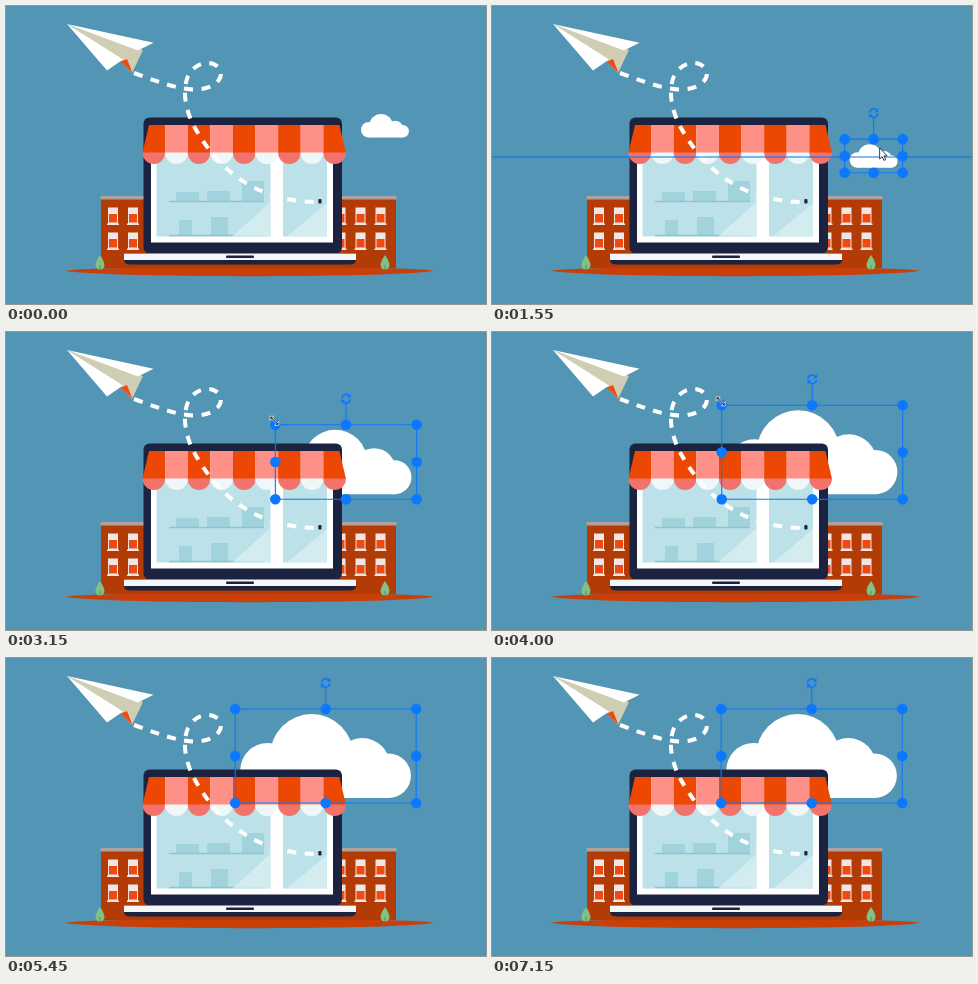
Write an HTML page that moves like this. It is 480 px wide and 298 px high and loops after 7200 ms.

```html
<!DOCTYPE html>
<html lang="en">
<head>
<meta charset="utf-8">
<title>Cloud over the shop</title>
<style>
  html, body { margin: 0; width: 100%; height: 100%; overflow: hidden; background: #5295b4; }
  svg { display: block; width: 100vw; height: 100vh; }
</style>
</head>
<body>
<svg viewBox="0 0 480 298" xmlns="http://www.w3.org/2000/svg">
  <defs>
    <g id="window">
      <path d="M.5 0h10v16h-10zM-.5 16h12v1.500h-12z" fill="#f1e6e4"/>
      <path d="M1.500 6.500h8v8.500h-8z" fill="#ef4a12"/>
    </g>
    <g id="bush">
      <path d="M0 -7C3 -3 4.500 1 4.500 3A4.500 4.500 0 0 1 -4.500 3C-4.500 1 -3 -3 0 -7z" fill="#7fc283"/>
      <path d="M0 3v5" stroke="#5b8c5c"/>
    </g>
  </defs>
  <rect width="480" height="298" fill="#5295b4"/>

  <g id="cloud" fill="#fff">
    <circle cx="27.5" cy="56.5" r="27.5"/>
    <circle cx="71.5" cy="41.5" r="41.5"/>
    <circle cx="122" cy="52" r="28"/>
    <circle cx="148.5" cy="61.8" r="22.2"/>
    <path d="M27.5 50h121v34h-121z"/>
  </g>

  <path d="M59.500 264.800C90 259.500 398 259.500 428 264.800C398 272 90 272 59.500 264.800z" fill="#c83f0a"/>
  <path d="M95 192h295v70h-295z" fill="#b23b06"/>
  <path d="M94.500 190h296v3.500h-296z" fill="#b0a19d"/>
  <g id="windows"></g>
  <use href="#bush" x="94" y="256"/>
  <use href="#bush" x="379" y="256"/>

  <rect x="137.5" y="111.5" width="198.500" height="136" rx="6" fill="#1c2340"/>
  <rect x="145" y="119" width="182" height="117.500" fill="#fff"/>
  <path d="M150.500 150h114v80.500h-114zM277 150h44v80.500h-44z" fill="#bce1e8"/>
  <path d="M170 186h23v9h-23zM201 185h23v10h-23zM236 175h22v20h-22zM173 214h13v16h-13zM205 211h17v19h-17z" fill="#a1d3dc"/>
  <path d="M163 195.500h95M163 229.500h95" stroke="#8fc4cf" stroke-width="1.500"/>
  <path d="M226 230.500L264.500 196V230.500zM281 230.500L321 197V230.500z" fill="#d9eff3" opacity=".8"/>
  <rect x="312.300" y="193" width="3.200" height="4.500" rx="1" fill="#1c2340"/>
  <g id="awning"></g>

  <path d="M118 247H350V254Q350 258.500 343 258.500H125Q118 258.500 118 254z" fill="#1c2340"/>
  <path d="M118 247.500H350V254H118z" fill="#f5f6f8"/>
  <rect x="220" y="249.500" width="28" height="2.500" rx="1" fill="#1c2340"/>

  <path d="M128 67C148 74 166 82 187 83.500C207 84 217 74 214.500 65C210 53 190 54 182 70C176 84 179 104 189 122C206 152 240 196 312 196"
    fill="none" stroke="#fff" stroke-width="4" stroke-dasharray="9 8.500"/>
  <path d="M61 18L137 44L126 67L115 55z" fill="#cfceb3"/>
  <path d="M61 18L101 64.500L117 53.500zM61 18L147.500 36.700L132 44.500z" fill="#fff"/>
  <path d="M115 55.500L121 53L126.500 67z" fill="#ee4a12"/>

  <path id="guide" d="M0 151H480" stroke="#0b72e8" stroke-width="1.200"/>
  <g id="selection" fill="none" stroke="#0b78ff">
    <path id="outline" stroke-width="1.100"/>
    <g id="handles" fill="#0b78ff" stroke="none"></g>
    <g id="rotate">
      <path d="M-4.200 -.5A4.300 4.300 0 0 1 3.200 -2.900M4.200 .5A4.300 4.300 0 0 1 -3.200 2.900" stroke-width="1.700"/>
      <path d="M4.800 -5.200V-1H.8zM-4.800 5.200V1H-.8z" fill="#0b78ff" stroke="none"/>
    </g>
  </g>
  <g id="cursor">
    <path id="arrow" d="M0 0V11L2.500 8.800L4.300 12.500L6 11.700L4.300 8H7.500z" fill="#fff" stroke="#222b38" stroke-width=".9"/>
    <path id="resizer" d="M-4.500 -4.500H-.5L-2 -3L3 2L4.500 .5V4.500H.5L2 3L-3 -2L-4.500 -.5z"
      fill="#1b2330" stroke="#fff" stroke-width=".7" stroke-linejoin="round"/>
  </g>
</svg>
<script>
const LOOP = 7200;
const CLOUD = { w: 171, h: 84 };
const PAD = 5, STEM = 26, SMALL = 58, LARGE = 181;
const $ = id => document.getElementById(id);

function add(parent, tag, attrs) {
  const node = document.createElementNS("http://www.w3.org/2000/svg", tag);
  for (const key in attrs) node.setAttribute(key, attrs[key]);
  return parent.appendChild(node);
}

// Awning: upright stripes, only the outer edges slant
const STRIPES = 9, HEM = 136.5, STRIPE_W = 22.6, SLANT = 6.5;
for (let i = 0; i < STRIPES; i++) {
  const strong = i % 2 === 0;
  const a = HEM + i * STRIPE_W, b = a + STRIPE_W;
  const topA = i === 0 ? a + SLANT : a;
  const topB = i === STRIPES - 1 ? b - SLANT : b;
  add($("awning"), "path", {
    d: `M${a} 146V147A${STRIPE_W / 2} 11 0 0 0 ${b} 147V146z`,
    fill: strong ? "#f1736b" : "#f0f7f9"
  });
  add($("awning"), "path", {
    d: `M${topA} 119H${topB}L${b} 146.5H${a}z`,
    fill: strong ? "#ec4804" : "#ff9087"
  });
}

function windowGrid(x0, columns) {
  for (let i = 0; i < columns * 2; i++)
    add($("windows"), "use", {
      href: "#window", x: x0 + 20 * (i >> 1), y: 201.5 + 25 * (i % 2)
    });
}
windowGrid(101.5, 2);
windowGrid(329, 3);

const handles = [];
for (const u of [0, .5, 1])
  for (const v of [0, .5, 1])
    if (u !== .5 || v !== .5)
      handles.push({ u, v, node: add($("handles"), "circle", { r: 5.3 }) });

const progress = (t, from, to) => Math.min(1, Math.max(0, (t - from) / (to - from)));
const smooth = (t, from, to) => {
  const p = progress(t, from, to);
  return p * p * (3 - 2 * p);
};
const easeOut = (t, from, to) => 1 - (1 - progress(t, from, to)) ** 3;
const mix = (a, b, k) => a + (b - a) * k;
const toward = (p, q, k) => ({ x: mix(p.x, q.x, k), y: mix(p.y, q.y, k) });

// Drag down, enlarge from the top-left corner, lift
function boxAt(t) {
  const drop = smooth(t, 1000, 1600), lift = smooth(t, 4600, 5150);
  const w = mix(SMALL, LARGE, easeOut(t, 2780, 3960));
  const scale = (w - 2 * PAD) / CLOUD.w;
  const h = CLOUD.h * scale + 2 * PAD;
  const left = 408 + 2.7 * drop - .5 * lift - w;
  const top = 136.5 + 30.8 * drop - 22.3 * lift - h;
  return { left, top, w, h, scale };
}

// Enter to the cloud, visit the corner, return, leave
function cursorAt(t, { left, top, w, h }) {
  const grip = { x: left + w / 2 + 6, y: top + h / 2 - 8 };
  const corner = { x: left - 1, y: top - 4 };
  const atCorner = smooth(t, 2000, 2550) - smooth(t, 4050, 4500);
  const entering = toward({ x: 468, y: 200 }, grip, smooth(t, 80, 700));
  const working = toward(entering, corner, atCorner);
  return toward(working, { x: 458, y: 120 }, smooth(t, 5250, 5400));
}

const show = (id, on) => $(id).setAttribute("display", on ? "inline" : "none");
const place = (id, x, y, scale = 1) =>
  $(id).setAttribute("transform", `translate(${x} ${y}) scale(${scale})`);

function render(t) {
  const box = boxAt(t);
  const { left, top, w, h } = box;
  const mid = left + w / 2;

  place("cloud", left + PAD, top + PAD, box.scale);
  $("outline").setAttribute("d", `M${left} ${top}h${w}v${h}h${-w}zM${mid} ${top}v${5 - STEM}`);
  for (const { u, v, node } of handles) {
    node.setAttribute("cx", left + u * w);
    node.setAttribute("cy", top + v * h);
  }
  place("rotate", mid, top - STEM);
  show("selection", t >= 850);
  show("guide", t >= 1550 && t < 1950);

  const { x, y } = cursorAt(t, box);
  place("cursor", x, y);
  const resizing = t >= 2500 && t < 4100;
  show("cursor", t >= 80 && t < 5400);
  show("arrow", !resizing);
  show("resizer", resizing);
}

const start = performance.now();
function tick() {
  render((performance.now() - start) % LOOP);
  requestAnimationFrame(tick);
}
tick();
</script>
</body>
</html>
```
